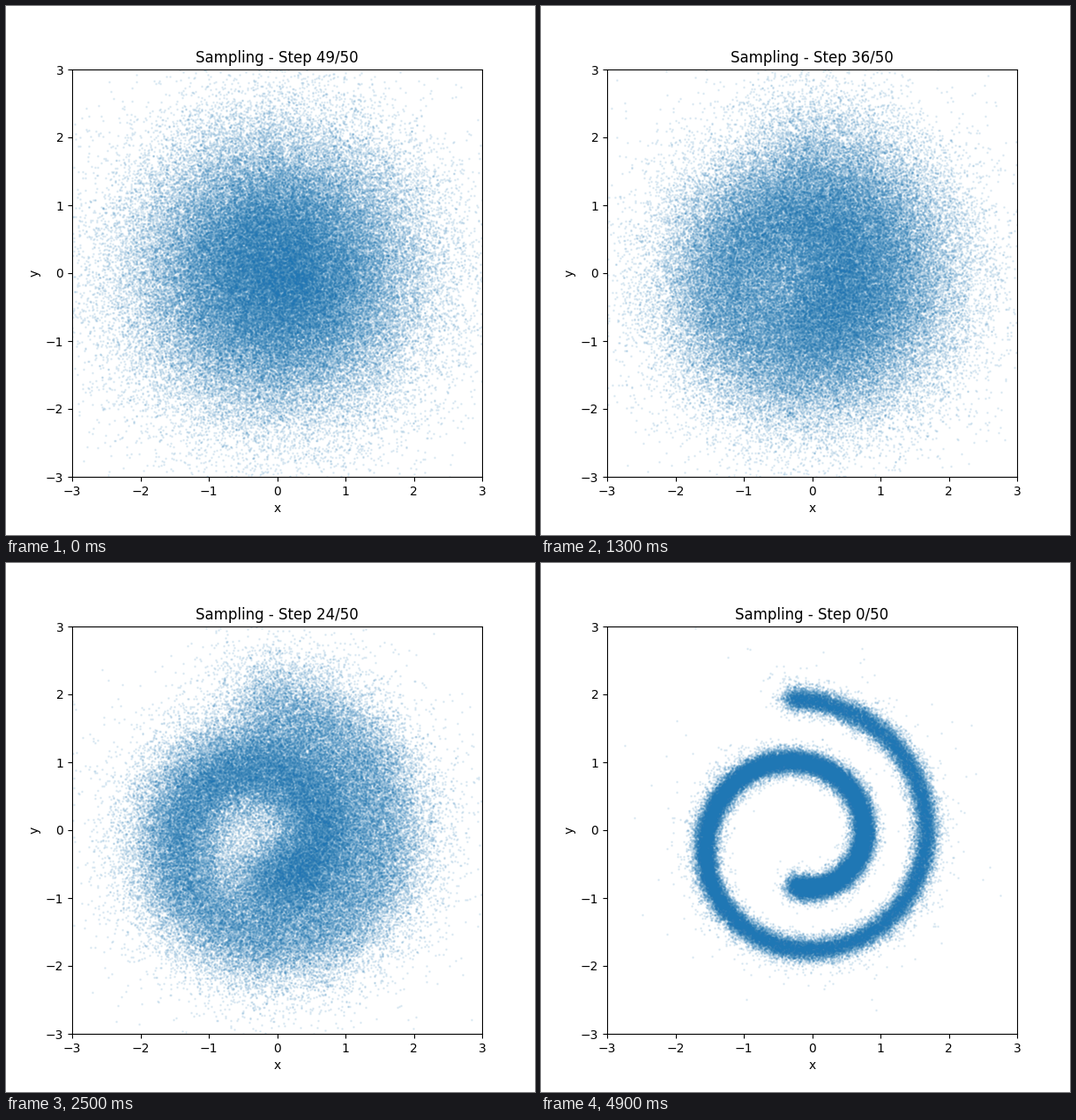
Animation, 600 px wide and 600 px high, one loop 5000 ms. Source, as a matplotlib script:

```python
import numpy as np
import matplotlib.pyplot as plt
from matplotlib.animation import FuncAnimation

STEPS = 50
COUNT = 100000
DATA_STD = 0.075
NOISE_CAP = 2.6  # soft bound on the predicted noise; leaves a few stragglers
LIMIT, CELLS = 5.0, 200

rng = np.random.default_rng(7)
betas = np.linspace(1e-4, 0.02, STEPS)
alpha_bars = np.cumprod(1 - betas)

# Centre line of the spiral the samples settle on
phi = np.linspace(-0.1, 3 * np.pi + 0.05, 240)
radius = 0.70 + 0.145 * phi
spiral = np.column_stack([radius * np.sin(phi) - 0.175,
                          -radius * np.cos(phi) - 0.14])
axis = np.linspace(-LIMIT, LIMIT, CELLS + 1)


def mean_field(scale, var):
    """Posterior mean of the scaled centre line on a regular grid."""
    centers = scale * spiral
    wx = np.exp(-(axis[:, None] - centers[:, 0]) ** 2 / (2 * var))
    wy = np.exp(-(axis[:, None] - centers[:, 1]) ** 2 / (2 * var))
    total = wx @ wy.T + 1e-300
    return np.stack([(wx * c) @ wy.T / total for c in centers.T], axis=-1)


def interpolate(field, pts):
    pos = np.clip((pts + LIMIT) * CELLS / (2 * LIMIT), 0, CELLS - 1e-6)
    i, j = pos.astype(int).T
    u, v = (pos % 1).T[..., None]
    return ((1 - u) * ((1 - v) * field[i, j] + v * field[i, j + 1])
            + u * ((1 - v) * field[i + 1, j] + v * field[i + 1, j + 1]))


def predict_noise(pts, bar):
    var = bar * DATA_STD ** 2 + 1 - bar
    offset = pts - interpolate(mean_field(np.sqrt(bar), var), pts)
    noise = offset * np.sqrt(1 - bar) / var
    size = np.linalg.norm(noise, axis=1, keepdims=True) + 1e-12
    return noise * NOISE_CAP * np.tanh(size / NOISE_CAP) / size


def sample():
    """Reverse diffusion from Gaussian noise; one cloud per step."""
    pts = rng.standard_normal((COUNT, 2))
    clouds = []
    for step in reversed(range(STEPS)):
        beta, bar = betas[step], alpha_bars[step]
        shift = beta / np.sqrt(1 - bar) * predict_noise(pts, bar)
        pts = (pts - shift) / np.sqrt(1 - beta)
        if step:
            pts = pts + np.sqrt(beta) * rng.standard_normal(pts.shape)
        clouds.append(pts)
    return clouds


clouds = sample()

fig, ax = plt.subplots(figsize=(6, 6), dpi=100)
dots = ax.scatter(*clouds[0].T, s=1, alpha=0.1)
ax.set(xlim=(-3, 3), ylim=(-3, 3), xlabel="x", ylabel="y")
title = ax.set_title("")


def update(frame):
    dots.set_offsets(clouds[frame])
    title.set_text(f"Sampling - Step {STEPS - 1 - frame}/{STEPS}")
    return dots, title


anim = FuncAnimation(fig, update, frames=STEPS, interval=100, repeat=True)
plt.show()
```
